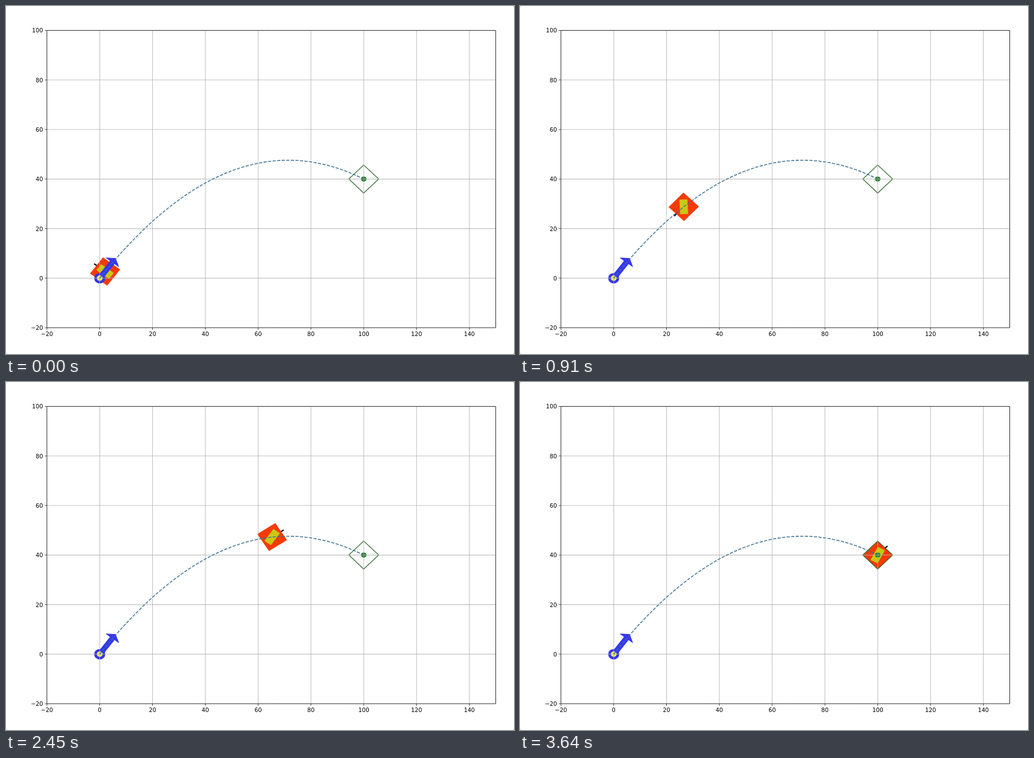
These frames come from a looping animation (903 px wide and 620 px high, 3.71 s). An HTML page with a canvas:

```html
<!DOCTYPE html>
<html lang="en">
<head>
<meta charset="utf-8">
<title>Projectile with rotating body</title>
<style>
html, body { margin: 0; width: 100%; height: 100%; overflow: hidden; background: #d8d8d8; }
canvas { display: block; border-radius: 4px; background: #fff; }
</style>
</head>
<body>
<canvas id="plot" width="903" height="620"></canvas>
<script>
const ctx = document.getElementById('plot').getContext('2d');
const LOOP = 3710, STEP = 70, RAD = Math.PI / 180;

const X = x => 166.6 + 4.693 * x;
const Y = y => 484.9 - 4.414 * y;
const height = x => x * 4 / 3 - x * x * 0.028 / 3;

// Position along the path per display step; playback is slightly uneven.
const progressKeys = [[0, 1], [9, 9], [13, 13], [22, 21], [28, 27], [41, 37], [52, 49]];
const bodyKeys = [[1, 143], [9, 186.5], [13, 226], [21, 316], [27, 369], [37, 404.5], [49, 405]];
const coreKeys = [[1, 143], [9, 100], [13, 93], [21, 153], [27, 216], [37, 243], [49, 243]];

function segment(keys, t) {
  let i = 0;
  while (i < keys.length - 2 && t > keys[i + 1][0]) i++;
  return i;
}

function linear(keys, t) {
  const i = segment(keys, t), [a, u] = keys[i], [b, v] = keys[i + 1];
  return u + (v - u) * (t - a) / (b - a);
}

// Monotone cubic interpolation.
function smooth(keys, t) {
  const rate = i => keys[i + 1] && keys[i]
    ? (keys[i + 1][1] - keys[i][1]) / (keys[i + 1][0] - keys[i][0]) : 0;
  const slope = i => {
    const p = rate(i - 1), q = rate(i);
    return p * q > 0 ? 2 * p * q / (p + q) : 0;
  };
  const i = segment(keys, t), [a, u] = keys[i], [b, v] = keys[i + 1];
  const w = b - a, s = (t - a) / w, r = 1 - s;
  return u * r * r * (1 + 2 * s) + v * s * s * (3 - 2 * s)
    + w * s * r * (slope(i) * r - slope(i + 1) * s);
}

function trace(points, cx = 0, cy = 0, degrees = 0) {
  const c = Math.cos(degrees * RAD), s = Math.sin(degrees * RAD);
  ctx.beginPath();
  for (const [x, y] of points) ctx.lineTo(X(cx + x * c - y * s), Y(cy + x * s + y * c));
}

function fill(color) {
  ctx.fillStyle = color;
  ctx.fill();
}

function stroke(color, width) {
  ctx.strokeStyle = color;
  ctx.lineWidth = width;
  ctx.stroke();
}

const rect = (w, h) => [[-w / 2, -h / 2], [w / 2, -h / 2], [w / 2, h / 2], [-w / 2, h / 2]];

function disc(x, y, r, color) {
  ctx.beginPath();
  ctx.ellipse(X(x), Y(y), r * 4.693, r * 4.414, 0, 0, 2 * Math.PI);
  fill(color);
}

function drawBody(k) {
  const x = k * 100 / 49, y = height(x), angle = smooth(bodyKeys, k);
  trace([[3.8, 0], [5.2, 0]], x, y, angle);
  stroke('#000', 2.2);
  trace(rect(8, 8), x, y, angle);
  ctx.closePath();
  fill('#f63a05');
  stroke('#dc3c12', 0.8);
  trace(rect(5.9, 3), x, y, smooth(coreKeys, k));
  fill('#c8c813');
}

function drawLauncher() {
  disc(0, 0, 2.1, '#3434e6');
  trace([[0, -1], [8, -1], [8, -3], [10, 0], [8, 3], [8, 1], [0, 1]], 0, 0, Math.atan2(4, 3) / RAD);
  ctx.closePath();
  fill('#3636f2');
  stroke('#2f2fe0', 0.8);
  disc(0, 0, 1.1, '#f0ec68');
}

function drawTarget() {
  disc(100, 40, 1.05, '#2b852b');
  trace(rect(8, 8), 100, 40, 45);
  ctx.closePath();
  stroke('#2f692b', 1.3);
}

function drawGrid() {
  for (let x = 0; x <= 140; x += 20) {
    trace([[x, -20], [x, 100]]);
    stroke('rgba(176,176,176,.8)', 1.1);
  }
  for (let y = 0; y <= 80; y += 20) {
    trace([[-20, y], [150, y]]);
    stroke('rgba(176,176,176,.8)', 1.1);
  }
}

function drawPath() {
  trace(Array.from({ length: 50 }, (_, i) => [i * 100 / 49, height(i * 100 / 49)]));
  ctx.setLineDash([5.66, 2.45]);
  stroke('#3b7096', 1.53);
  ctx.setLineDash([]);
}

function drawAxes() {
  trace(rect(170, 120), 65, 40);
  ctx.closePath();
  stroke('#222', 1);
  ctx.font = '10.2px "DejaVu Sans", sans-serif';
  ctx.fillStyle = '#000';
  const label = v => String(v).replace('-', '\u2212');
  ctx.beginPath();
  for (let v = -20; v <= 140; v += 20) {
    ctx.moveTo(X(v), Y(-20));
    ctx.lineTo(X(v), Y(-20) + 3.6);
    ctx.textAlign = 'center';
    ctx.fillText(label(v), X(v), 588.4);
    if (v > 100) continue;
    ctx.moveTo(X(-20), Y(v));
    ctx.lineTo(X(-20) - 3.6, Y(v));
    ctx.textAlign = 'right';
    ctx.fillText(label(v), 65.7, Y(v) + 3.9);
  }
  stroke('#222', 0.9);
}

function draw(now) {
  const step = Math.floor(now % LOOP / STEP);
  ctx.clearRect(0, 0, 903, 620);
  drawBody(Math.round(linear(progressKeys, step)));
  drawLauncher();
  drawTarget();
  drawGrid();
  drawPath();
  drawAxes();
}

const start = performance.now();
function tick() {
  draw(performance.now() - start);
  requestAnimationFrame(tick);
}
tick();
</script>
</body>
</html>
```
